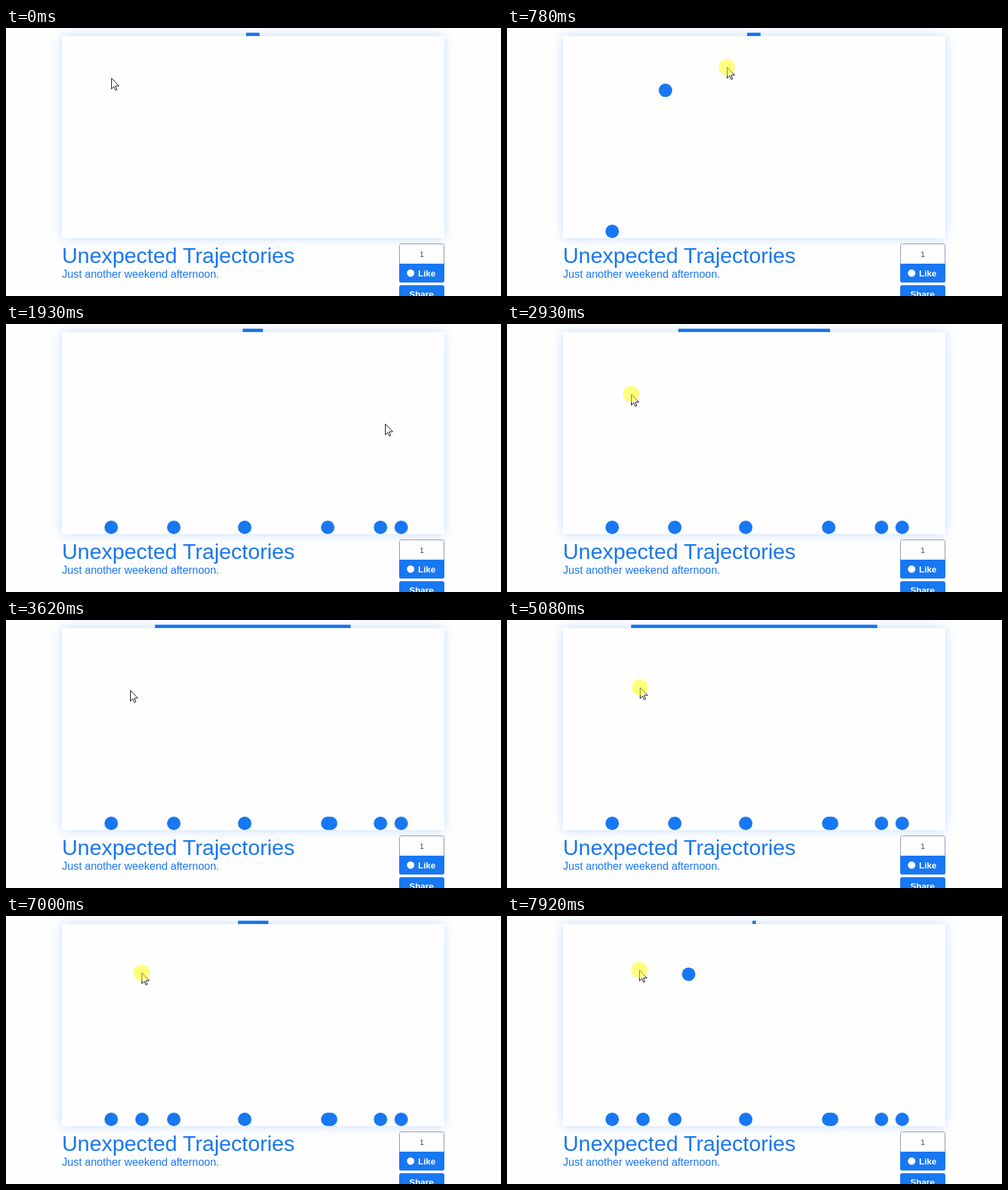
Recreate the animation shown at these times as an HTML page. Size 734x398 px, loop 8 s.

```html
<!DOCTYPE html>
<html lang="en">
<head>
<meta charset="utf-8">
<title>Unexpected Trajectories</title>
<style>
  html, body { margin: 0; width: 100%; height: 100%; overflow: hidden; background: #fefefe; }
  svg { display: block; font-family: "Liberation Sans", Arial, sans-serif; }
  .blue { fill: #1877f2; }
  #arena { fill: #fefefe; filter: drop-shadow(0 0 8px rgba(24, 119, 242, .25)); }
  .button { fill: #fff; font-size: 13px; font-weight: bold; }
</style>
</head>
<body>
<svg width="734" height="398" viewBox="0 0 734 398">
  <clipPath id="inside"><rect x="83" y="12" width="567" height="300"/></clipPath>
  <rect id="arena" x="83" y="12" width="567" height="300"/>
  <rect id="bar" class="blue" y="7" height="5"/>
  <g id="balls" class="blue" clip-path="url(#inside)"></g>

  <text class="blue" x="83" y="349" font-size="32">Unexpected Trajectories</text>
  <text class="blue" x="83" y="371" font-size="16">Just another weekend afternoon.</text>

  <rect x="583.5" y="320.5" width="66" height="57" rx="3" fill="#fefefe" stroke="#8b8fb8"/>
  <text x="616.5" y="340" font-size="11" text-anchor="middle" fill="#3b3f68">1</text>
  <path class="blue" d="M583 350h67v25q0 3-3 3h-61q-3 0-3-3z"/>
  <circle cx="600" cy="364" r="5.5" fill="#fff"/>
  <text class="button" x="611" y="369">Like</text>
  <rect class="blue" x="583" y="382" width="67" height="28" rx="3"/>
  <text class="button" x="598" y="400">Share</text>

  <path id="cursor" d="M.5 .5V16.5L4 13L6.5 18.5L8.5 17.5L6.3 12H11.5Z" fill="#fff" stroke="#111"/>
  <circle id="press" r="12" fill="#ff0" fill-opacity=".5"/>
</svg>
<script>
const LOOP = 8000, STEP = 76.77, GLIDE = 200, FLOOR = 302;
const FALL = 2.35e-6, SPEED = 0.00238, CHARGE = 0.06;
const $ = id => document.getElementById(id);

const shot = (press, x, y, hold = 100) => ({ press, x, y, hold });
const shots = [
  shot(215, 156, 74, 20),
  shot(446, 221, 62),
  shot(710, 326, 58),
  shot(871, 450, 81),
  shot(1030, 528, 75),
  shot(1350, 562, 148),
  shot(2180, 184, 104, 982),
  shot(3855, 197, 100, 1636),
  shot(6355, 175, 90),
  shot(6838, 201, 84, 982),
  shot(7895, 196, 80, 205)
];

for (const s of shots) {
  s.ball = document.createElementNS("http://www.w3.org/2000/svg", "circle");
  s.ball.setAttribute("r", 10);
  $("balls").append(s.ball);
}

const place = (el, x, y) => el.setAttribute("transform", `translate(${x} ${y})`);
const show = (el, on) => el.setAttribute("visibility", on ? "visible" : "hidden");
const charge = held => Math.max(5, 5 * Math.floor(held * CHARGE));

// The pointer rests where it last fired, then eases to the next spot just before the press.
function cursorAt(t) {
  let { x, y } = shots[0], free = 0;
  for (const s of shots) {
    const time = Math.min(GLIDE, s.press - free);
    const left = Math.min(1, Math.max(0, (s.press - t) / time)) ** 2;
    x = s.x + (x - s.x) * left;
    y = s.y + (y - s.y) * left;
    free = s.press + s.hold;
    if (t < free) break;
  }
  return [Math.round(x), Math.round(y)];
}

// Sideways speed grows with the charge; the fall is cubic in time.
function moveBall({ ball, x, y, hold }, age) {
  show(ball, age >= 0);
  const flight = Math.min(Math.max(0, age), Math.cbrt((FLOOR - y) / FALL));
  place(ball, x + SPEED * (charge(hold) - 5) * flight, y + FALL * flight ** 3);
}

function draw(t) {
  let width = 20, pressed = false;
  for (const s of shots) {
    const held = t - s.press;
    if (held >= 0) {
      width = charge(Math.min(held, s.hold));
      pressed = held < s.hold;
    }
    moveBall(s, held - s.hold);
  }
  $("bar").setAttribute("x", Math.ceil(366 - width / 2));
  $("bar").setAttribute("width", width);

  const [x, y] = cursorAt(t);
  place($("cursor"), x, y);
  place($("press"), x, y);
  show($("press"), pressed);
}

// The picture advances in even steps after a short opening hold.
function tick() {
  const step = Math.floor((performance.now() % LOOP - 160) / STEP);
  draw(step < 0 ? 0 : 167 + step * STEP);
  requestAnimationFrame(tick);
}
tick();
</script>
</body>
</html>
```
